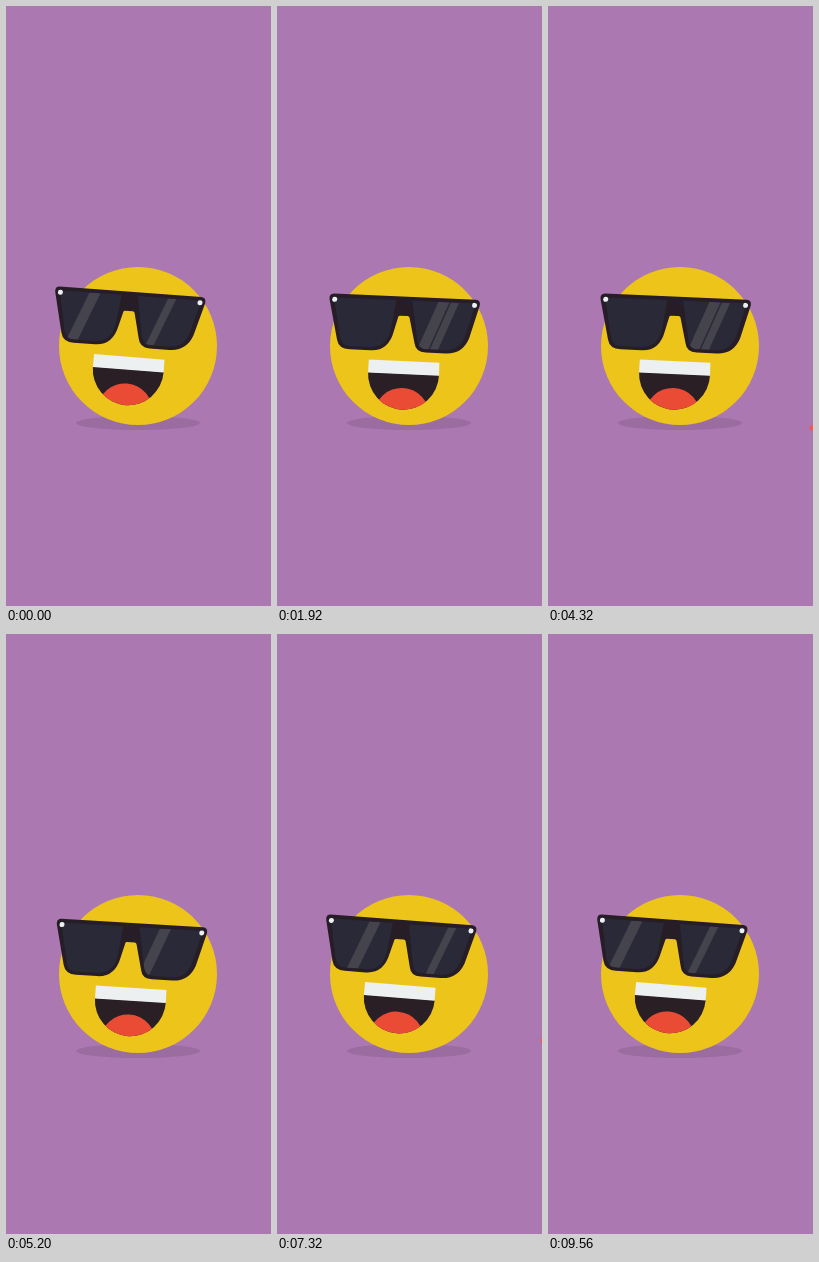
An HTML page that plays this animation: 265x600 px, repeating every 9600 ms.

```html
<!DOCTYPE html>
<html lang="en">
<head>
<meta charset="utf-8">
<style>
  html, body { margin: 0; width: 100%; height: 100%; overflow: hidden; background: #ab78b2; }
  svg { display: block; width: 100%; height: 100%; }
</style>
</head>
<body>
<svg viewBox="0 0 265 600">
  <defs>
    <clipPath id="lenses">
      <path id="lensShape" d="M-68 -2H-8.5L-12.5 28Q-16 46 -33 46H-53Q-61 46 -63 38L-70 2Q-70 -2 -68 -2Z
        M7.5 -2H68Q70 -2 70 2L62 31Q57 46 42 46H24Q16 46 14.5 38Z"/>
    </clipPath>
    <clipPath id="mouthClip"><path d="M-35.5 13H35.5A35.5 35.5 0 0 1 -35.5 13Z"/></clipPath>
  </defs>
  <ellipse cx="132" cy="417" rx="62" ry="7" fill="#9a6ca0"/>
  <circle cx="132" cy="340" r="79" fill="#edc51a"/>
  <g id="mouth">
    <path d="M-35.5 12.5H35.5A35.5 36 0 0 1 -35.5 12.5Z" fill="#2b1f26"/>
    <circle cy="54.5" r="27.7" fill="#e94b35" clip-path="url(#mouthClip)"/>
    <path d="M-35.3 0H35.3L35.5 13H-35.5Z" fill="#ecf0f1"/>
  </g>
  <g id="glasses">
    <path fill="#271d26" d="M-71 -5.8H71Q76 -5.5 75.2 0L66 33Q60 49.3 43 49.3H23Q13 49.3 11.5 40L5.5 15Q5 13.6 3.5 13.6H-4Q-5.5 13.6 -5.8 15L-9.5 29Q-14 49.3 -32 49.3H-53Q-64 49.3 -66 40L-75.2 0Q-76 -5.5 -71 -5.8Z"/>
    <use href="#lensShape" fill="#2a2938"/>
    <g clip-path="url(#lenses)" fill="#45444c">
      <path id="wideGlare" d="M-30 -2H-41L-61 48H-50Z"/>
      <path id="thinGlare" d="M46 -2H38L18 48H26Z"/>
    </g>
    <circle cx="-70" r="2.5" fill="#ecf0f1"/>
    <circle cx="70" r="2.5" fill="#ecf0f1"/>
  </g>
  <circle id="spark" r="3" fill="#ee5a5a"/>
</svg>
<script>
const LOOP = 9600, SWING = 2400;
const el = id => document.getElementById(id);
const easeInOutQuart = s => s < .5 ? 8 * s ** 4 : 1 - 8 * (1 - s) ** 4;

// Linear interpolation through [time, value] pairs
function track(keys, t) {
  const i = Math.max(1, keys.findIndex(k => k[0] >= t));
  const [t0, v0] = keys[i - 1], [t1, v1] = keys[i];
  return v0 + (v1 - v0) * (t - t0) / (t1 - t0);
}

const wideKeys = [[0, 0], [120, 9], [780, 150], [1560, 150], [1920, 75], [2360, 0], [2400, 0]];
const thinKeys = [[0, 0], [120, 9], [500, 60], [1560, 60], [1920, 8.5], [2360, 0], [2400, 0]];

function place(id, x, y, angle = 0) {
  el(id).setAttribute('transform', `translate(${x} ${y}) rotate(${angle})`);
}

function drawFace(phase) {
  const half = phase / (SWING / 2);
  const e = half < 1 ? easeInOutQuart(half) : 1 - easeInOutQuart(half - 1);
  const u = 2 * e - 1;
  const dip = Math.max(0, 1 - u * u) ** .67;
  place('glasses', 132.7 + 8.5 * u, 291.5 + 6.5 * dip, -.2 - 4.5 * u);
  place('mouth', 132.7 + 9.4 * u, 350.8 + 5.9 * dip, -.3 - 4.9 * u);
  place('wideGlare', track(wideKeys, phase), 0);
  place('thinGlare', track(thinKeys, phase), 0);
}

// A red spark peeks in at the right edge once a second
function drawSpark(t) {
  const variant = Math.floor(t / 1000) % 4;
  const p = (t % 1000 - 250) / 250;
  const visible = p > 0 && p < 1;
  el('spark').style.display = visible ? '' : 'none';
  if (visible) place('spark', 270 + .7 * variant - 7 * Math.sin(Math.PI * p), 440 - (64 + 18 * variant) * p);
}

function frame() {
  const t = performance.now() % LOOP;
  drawFace(t % SWING);
  drawSpark(t);
  requestAnimationFrame(frame);
}
frame();
</script>
</body>
</html>
```
